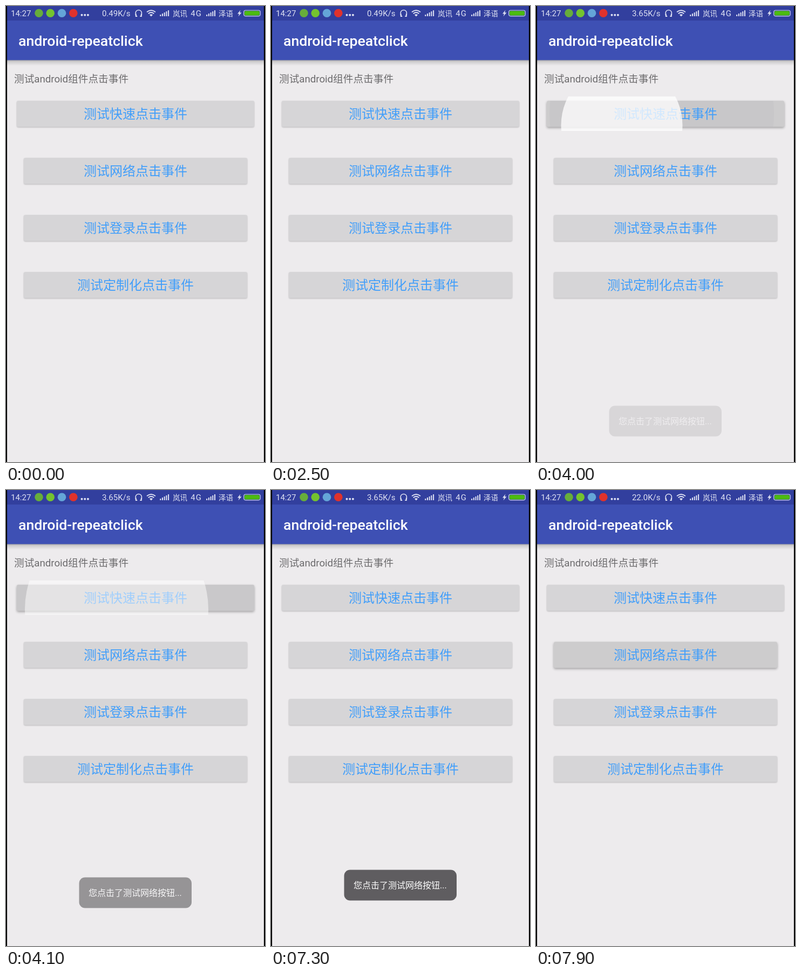
An HTML page for the animation above (8000 ms loop, 480x847 px).

```html
<!DOCTYPE html>
<html lang="zh-CN">
<head>
<meta charset="utf-8">
<title>android-repeatclick</title>
<style>
  html, body { margin: 0; height: 100%; overflow: hidden; background: #000; }
  svg { display: block; width: 100vw; height: 100vh; }
  text { font-family: Roboto, "Noto Sans CJK SC", "Noto Sans CJK", sans-serif; }
  .status { font-size: 15px; fill: #dfe2f3; }
  .carrier { font-size: 13.5px; }
  .label { font-size: 24px; fill: #419efa; text-anchor: middle; }
  .btn { filter: drop-shadow(0 1px 1px rgba(0, 0, 0, .22)); }
  .btn.pressed { filter: drop-shadow(0 2px 2px rgba(0, 0, 0, .32)); }
</style>
</head>
<body>
<svg viewBox="0 0 480 847" preserveAspectRatio="none">
  <defs>
    <linearGradient id="shade" x2="0" y2="1">
      <stop offset="0" stop-color="#000" stop-opacity=".32"/>
      <stop offset=".3" stop-color="#000" stop-opacity=".13"/>
      <stop offset="1" stop-color="#000" stop-opacity="0"/>
    </linearGradient>
    <clipPath id="bounds"><rect x="15" y="168" width="450" height="64"/></clipPath>
    <clipPath id="face"><rect x="20" y="176" width="440" height="48" rx="3"/></clipPath>
    <g id="bars" fill="#dfe2f3">
      <path d="M0 16h2v3h-2zM3.7 14h2v5h-2zM7.4 12h2v7h-2zM11.1 10h2v9h-2zM14.8 8h2v11h-2z"/>
    </g>
  </defs>

  <rect width="480" height="847" fill="#000"/>
  <rect x="2" width="476" height="847" fill="#edebed"/>
  <rect x="2" y="100" width="476" height="11" fill="url(#shade)"/>
  <rect x="2" y="26" width="476" height="74.5" fill="#3e50b4"/>
  <rect x="2" width="476" height="27" fill="#323f9e"/>

  <g id="statusBar">
    <text class="status" x="9" y="19">14:27</text>
    <circle cx="61" cy="13.3" r="7.8" fill="#67ad3b"/>
    <circle cx="82.2" cy="13.3" r="7.8" fill="#74c32f"/>
    <circle cx="103.5" cy="13.3" r="7.8" fill="#64a5d8"/>
    <circle cx="124.8" cy="13.3" r="7.8" fill="#e0322c"/>
    <g fill="#dfe2f3">
      <circle cx="140.5" cy="16.7" r="2"/><circle cx="146.2" cy="16.7" r="2"/><circle cx="151.9" cy="16.7" r="2"/>
    </g>
    <text class="status" id="speed" x="230.5" y="19" text-anchor="end"></text>
    <g fill="none" stroke="#dfe2f3" stroke-width="1.5">
      <path d="M240.2 17v-4a5.6 5.6 0 0 1 11.2 0v4"/>
      <path d="M240.8 14.5v4.5h2.4M250.8 14.5v4.5h-2.4" stroke-width="2"/>
      <path d="M261 11.3q8-6.6 16 0M263.7 14.2q5.300-4.400 10.600 0" stroke-width="1.800"/>
    </g>
    <path d="M265.900 16.300q3.100-2.200 6.200 0l-3.100 3.300z" fill="#dfe2f3"/>
    <use href="#bars" x="285.300"/>
    <text class="status carrier" x="309" y="18.500">岚讯</text>
    <text class="status" x="342.300" y="19" letter-spacing="1">4G</text>
    <use href="#bars" x="371.200"/>
    <text class="status carrier" x="394" y="18.500">泽语</text>
    <path d="M434.500 7.500l-5.500 7h3.200l-1.700 5 6-7.200h-3.300z" fill="#dfe2f3"/>
    <rect x="440.700" y="8" width="30.600" height="10.800" rx="3.500" fill="#323f9e" stroke="#cfd4ea" stroke-width="1.200"/>
    <rect x="442" y="9.300" width="28" height="8.200" rx="2.300" fill="#4cbb10"/>
  </g>

  <text x="23" y="74" font-size="26.670" font-weight="500" fill="#fff">android-repeatclick</text>
  <text x="15" y="141.500" font-size="18.670" fill="#6c6b6d">测试android组件点击事件</text>

  <g id="buttons"></g>
  <circle id="halo" cy="200" fill="#c8c7c9" clip-path="url(#face)"/>
  <text class="label" x="240" y="209">测试快速点击事件</text>
  <g clip-path="url(#bounds)"><circle id="ripple" cy="221.400" fill="#fff"/></g>

  <g id="toast">
    <rect x="135.500" y="705.500" width="208.500" height="57" rx="11" fill="#5d5b5e"/>
    <text x="153" y="740" font-size="16" fill="#fff">您点击了测试网络按钮...</text>
  </g>
</svg>
<script>
const LOOP = 8000, STEP = 100;
const $ = id => document.getElementById(id);

function svg(tag, attrs, parent) {
  const el = document.createElementNS("http://www.w3.org/2000/svg", tag);
  for (const k in attrs) el.setAttribute(k, attrs[k]);
  return parent.appendChild(el);
}

function addButton(x, y, label) {
  const face = svg("rect", { class: "btn", x, y, width: 480 - 2 * x, height: 48.5, rx: 3 }, $("buttons"));
  if (label) svg("text", { class: "label", x: 240, y: y + 33 }, $("buttons")).textContent = label;
  return face;
}

// The first label sits above the halo, so it is placed in the markup.
const quick = addButton(20, 176);
const network = addButton(33, 282, "测试网络点击事件");
addButton(33, 388, "测试登录点击事件");
addButton(33, 494, "测试定制化点击事件");
document.querySelectorAll(".btn").forEach(b => b.setAttribute("fill", "#d6d5d7"));

// time, then values; each row holds until the next
const speeds = [[0, "0.49K/s"], [3700, "3.65K/s"], [7500, "22.0K/s"]];
// halo x, halo radius, ripple x, ripple radius, halo opacity, ripple opacity
const touch = [
  [0, 240, 0, 240, 0, 0, 0],
  [3900, 200, 120, 130, 50, 1, .76],
  [4000, 233, 208, 159, 112.5, 1, .76],
  [4100, 240, 226, 205, 170, .7, .5],
  [4200, 240, 226, 235, 215, .3, .2],
  [4300, 240, 0, 240, 0, 0, 0]
];
// vertical offset, opacity
const toast = [
  [0, 37, 0], [4000, 37, .14], [4100, 14, .6], [4200, 3, .9], [4300, 0, 1],
  [7300, 0, .98], [7400, 0, .75], [7500, 0, .5], [7600, 0, .22], [7700, 0, 0]
];

const at = (rows, t) => rows.filter(r => r[0] <= t).pop().slice(1);

function set(el, attrs) {
  for (const k in attrs) el.setAttribute(k, attrs[k]);
}

function press(el, on) {
  el.classList.toggle("pressed", on);
  el.setAttribute("fill", on ? "#cdcccd" : "#d6d5d7");
}

function draw(now) {
  const t = Math.floor(now % LOOP / STEP) * STEP;
  $("speed").textContent = at(speeds, t)[0];
  press(quick, t >= 3800 && t < 4200);
  press(network, t >= 7900);

  const [hx, hr, rx, rr, ha, ra] = at(touch, t);
  set($("halo"), { cx: hx, r: hr, opacity: ha });
  set($("ripple"), { cx: rx, r: rr, opacity: ra });

  const [dy, alpha] = at(toast, t);
  set($("toast"), { transform: `translate(0 ${dy})`, opacity: alpha });
}

const start = performance.now();
function tick() {
  draw(performance.now() - start);
  requestAnimationFrame(tick);
}
tick();
</script>
</body>
</html>
```
